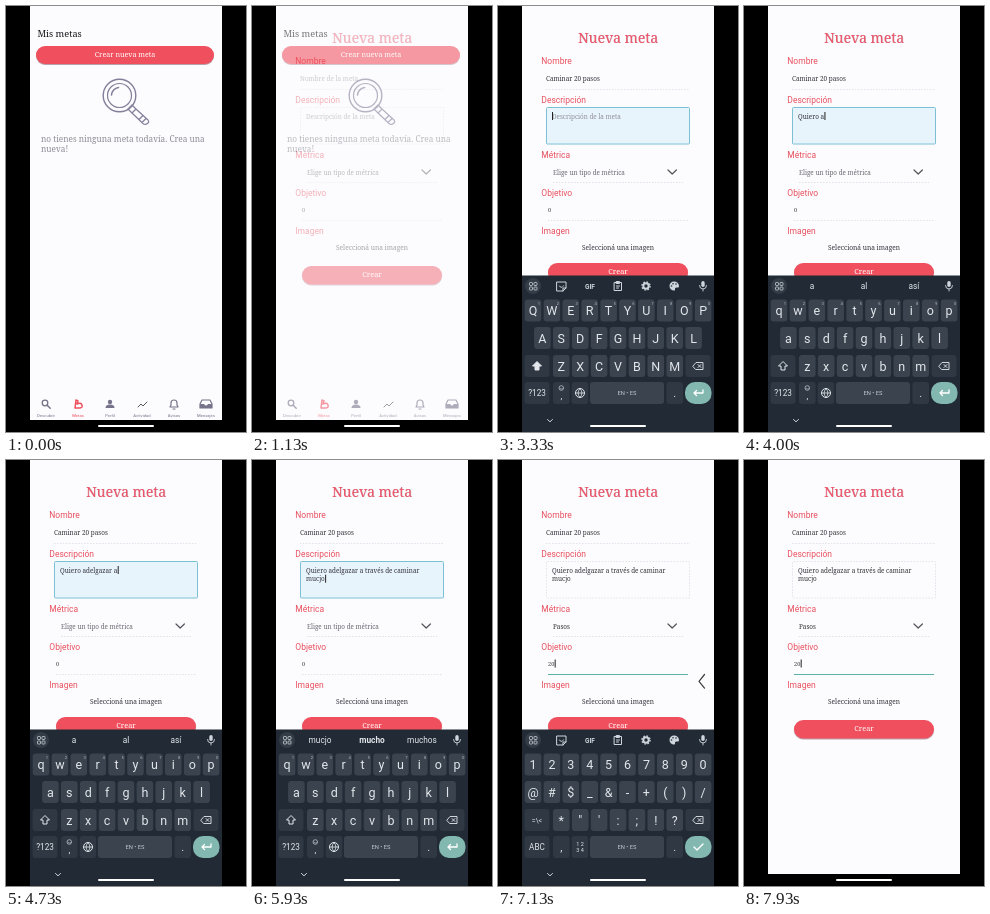
Recreate the animation shown at these times as an HTML page. Size 240x426 px, loop 8 s.

```html
<!DOCTYPE html>
<html lang="es">
<head>
<meta charset="utf-8">
<title>Nueva meta</title>
<style>
html, body { margin: 0; width: 100%; height: 100%; overflow: hidden; background: #000; }
svg { display: block; width: 100vw; height: 100vh; }
text { font-family: Roboto, sans-serif; white-space: pre; }
.slab { font-family: "Noto Serif", serif; }
.mid { text-anchor: middle; }
.line { fill: none; stroke-linecap: round; stroke-linejoin: round; }
</style>
</head>
<body>
<svg id="stage" viewBox="0 0 240 426"></svg>
<script>
const LOOP = 8000;
const PINK = '#f04f5d', INK = '#33323b', GREY = '#8f8d98', PAPER = '#fcfbfd';
const KEY = '#3a434e', KEY_DARK = '#2f3843', KEY_INK = '#e3e7ec';

const rect = (x, y, w, h, fill, r = 0, more = '') =>
  `<rect x="${x}" y="${y}" width="${w}" height="${h}" rx="${r}" fill="${fill}" ${more}/>`;
const circle = (x, y, r, fill, more = '') => `<circle cx="${x}" cy="${y}" r="${r}" fill="${fill}" ${more}/>`;
const text = (x, y, size, fill, str, cls = '', more = '') =>
  `<text x="${x}" y="${y}" font-size="${size}" fill="${fill}" class="${cls}" ${more}>${str}</text>`;
const slab = (x, y, size, fill, str, cls = '', more = '') => text(x, y, size, fill, str, 'slab ' + cls, more);
const line = (d, color, w = 1, more = '') =>
  `<path class="line" d="${d}" stroke="${color}" stroke-width="${w}" ${more}/>`;
const group = (id, body, more = '') => `<g id="${id}" ${more}>${body}</g>`;
const button = (x, y, w, h, label, size) =>
  rect(x, y + 1, w, h, '#b9a0ac', h / 2) + rect(x, y, w, h, PINK, h / 2) +
  slab(x + w / 2, y + h / 2 + 2.2, size, '#fff', label, 'mid', 'font-weight="500"');

function goalList() {
  const tabs = ['Descubrir', 'Metas', 'Perfil', 'Actividad', 'Avisos', 'Mensajes'];
  const c = '#77738a';
  const glass = '#837e99';
  return rect(24, 0, 192, 414, PAPER) +
    slab(31.5, 31, 9.2, '#17161c', 'Mis metas', '', 'font-weight="500"') +
    button(30, 40, 178, 18, 'Crear nueva meta', 7.1) +
    circle(113.5, 89.5, 16.3, 'none', `stroke="${glass}" stroke-width="1.4"`) +
    circle(113.5, 89.5, 12, 'none', `stroke="${glass}" stroke-width="1.2"`) +
    line('M105.5 89a8 8 0 0 1 7-7.5', glass, 1.6) +
    line('M122 103l4-4 4 4-4 4zM126 107l4-4 12 11q1.5 2-.5 3.500t-4 .5zM133 113.500l4-4M136 116.500l4-4', glass, 1.2) +
    slab(35, 136, 8.25, GREY, 'no tienes ninguna meta todavía. Crea una') +
    slab(35, 146, 8.25, GREY, 'nueva!') +
    circle(39, 397, 2.8, 'none', `stroke="${c}" stroke-width="1.3"`) + line('M41.200 399.200l3 3', c, 1.5) +
    line('M70 394l2 1-1 3q4-2 5 1t-3 3h-4z', PINK, 1.5) +
    circle(104, 396, 2.2, c) + `<path d="M99.500 402q0-3.500 4.500-3.500t4.500 3.500z" fill="${c}"/>` +
    line('M132 401l3-3 2 2 4-4', '#56545f', 1) +
    line('M164 401h8l-1-2v-2a3 3 0 0 0-6 0v2zM167 403h2', c, 1.2) +
    line('M194 398l2-4h8l2 4v4h-12z', c, 1.2) + `<path d="M194 398h4q2 3 4 0h4v4h-12z" fill="${c}"/>` +
    tabs.map((s, i) => text(40 + 32 * i, 410.5, 4.2, i === 1 ? PINK : c, s, 'mid')).join('');
}

function goalForm() {
  const label = (y, s) => text(43.3, y, 8.5, '#e85260', s);
  const dots = 'stroke-dasharray="1.5 1.5"';
  const rule = (id, x, y, w) => `<path id="${id}" d="M${x} ${y}h${w}" stroke-width="1"/>`;
  return rect(24, 0, 192, 414, PAPER) +
    slab(120.5, 37, 14, '#8d7c96', 'Nueva meta', 'mid', 'font-weight="500" opacity=".5"') +
    slab(120, 36.5, 14, '#ee5366', 'Nueva meta', 'mid', 'font-weight="500"') +
    label(58, 'Nombre') + label(97, 'Descripción') + label(152, 'Métrica') +
    label(190, 'Objetivo') + label(228, 'Imagen') +
    rule('nameRule', 48, 83.5, 144) + slab(48, 75, 6.4, INK, '', '', 'id="name"') +
    rect(48.5, 101.5, 143, 36.5, 'none', 1, 'id="descBox"') +
    slab(54, 112.5, 6.35, INK, '', '', 'id="desc1"') + slab(54, 121.2, 6.35, INK, '', '', 'id="desc2"') +
    slab(55, 168.5, 6.35, INK, '', '', 'id="metric"') +
    line('M170 164l4.200 4 4.200-4', '#55545c', 1.2) +
    `<path d="M55 176.500h130" stroke="#e2deea" ${dots}/>` +
    rule('goalRule', 50, 214.5, 140) + slab(50, 206, 5.6, INK, '', '', 'id="goal"') +
    slab(120, 244.3, 6.6, INK, 'Seleccioná una imagen', 'mid') +
    group('create', button(50, 260, 140, 18.5, 'Crear', 7.3)) +
    rect(0, 0, 1, 8, '#222', 0, 'id="caret"');
}

const keyBox = (cx, cy, w, fill = KEY) => rect(cx - w / 2, cy - 11, w, 22, fill, 3);
const key = (cx, cy, label, size = 12.5, w = 16.6) =>
  keyBox(cx, cy, w) + text(cx, cy + size * .36, size, KEY_INK, label, 'mid');
const keyRow = (labels, x, y) => labels.map((s, i) => key(x + 18.9 * i, y, s)).join('');

function letters(upper) {
  const row = s => [...(upper ? s.toUpperCase() : s)];
  const hints = [...'1234567890'].map((n, i) => text(41 + 18.9 * i, 299, 4.2, '#b4bbc4', n, 'mid')).join('');
  return keyRow(row('qwertyuiop'), 35, 304.5) + hints +
    keyRow(row('asdfghjkl'), 44.4, 332) + keyRow(row('zxcvbnm'), 63.3, 360) +
    keyBox(39, 360, 25, KEY_DARK) +
    `<path d="M39 355.500l4.500 4.500h-2.500v4h-4v-4h-2.500z" fill="${upper ? KEY_INK : 'none'}" stroke="${KEY_INK}"/>` +
    keyBox(39, 387, 25, KEY_DARK) + text(39, 390, 8.2, KEY_INK, '?123', 'mid') +
    keyBox(63.3, 387, 16.6, KEY_DARK) + text(63.3, 393, 9, KEY_INK, ',', 'mid') +
    circle(63.3, 382, 2.3, 'none', `stroke="${KEY_INK}" stroke-width=".6"`) +
    line('M62 382.500q1.300 1.300 2.600 0', KEY_INK, .5) +
    keyBox(82, 387, 16.6, KEY_DARK) + circle(82, 387, 4.5, 'none', `stroke="${KEY_INK}"`) +
    line('M77.500 387h9M82 382.500q-4 4.500 0 9q4-4.500 0-9', KEY_INK, .8);
}

function symbols() {
  return keyRow([...'1234567890'], 35, 304.5) +
    keyRow(['@', '#', '$', '_', '&amp;', '-', '+', '(', ')', '/'], 35, 332) +
    keyRow([...'*"\':;!?'], 63.3, 360) +
    keyBox(39, 360, 25, KEY_DARK) + text(39, 362.5, 7, KEY_INK, '=\\&lt;', 'mid') +
    keyBox(39, 387, 25, KEY_DARK) + text(39, 390, 8.2, KEY_INK, 'ABC', 'mid') +
    keyBox(63.3, 387, 16.6, KEY_DARK) + text(63.3, 391, 11, KEY_INK, ',', 'mid') +
    keyBox(82, 387, 16.6, KEY_DARK) +
    text(82, 386, 5.5, KEY_INK, '1 2', 'mid') + text(82, 392, 5.5, KEY_INK, '3 4', 'mid');
}

function keyboard() {
  const c = '#cfd5dc';
  const tiles = [[32, 277], [36.5, 277], [32, 281.5], [36.5, 281.5]]
    .map(([x, y]) => rect(x - .5, y - .5, 3, 3, 'none', .7, `stroke="${c}" stroke-width=".8"`)).join('');
  const tools =
    line('M59 276h9v6l-3 3h-6zM65 285v-3h3M61.500 280q1.500 3 4 0', c, 1) +
    text(92, 282.5, 6.5, c, 'GIF', 'mid', 'font-weight="700"') +
    line('M116.500 276.500h7v8h-7zM118.500 275.500h3v2h-3zM118.500 280h3M118.500 282h2', c, 1) +
    circle(148, 280, 2.7, 'none', `stroke="${c}" stroke-width="2"`) +
    circle(148, 280, 4.1, 'none', `stroke="${c}" stroke-width="1.3" stroke-dasharray="1.6 1.62"`) +
    `<path d="M176 275.500a4.500 4.500 0 1 0 0 9q1.500 0 1-1.500t1.500-1.500h1.500q1 0 1-1.500a4.800 4.500 0 0 0-5-4.500" fill="${c}"/>` +
    [[173.5, 280], [175, 277.7], [178, 278]].map(([x, y]) => circle(x, y, .8, '#222b36')).join('');
  const words = [68, 120, 170].map((x, i) => text(x, 283, 8.3, KEY_INK, '', 'mid', `id="word${i}"`)).join('');
  return rect(24, 269.5, 192, 157, '#212a35') +
    circle(35, 280, 8, '#333c47') + tiles + group('tools', tools) + group('words', words) +
    rect(203.3, 275, 3.4, 6, c, 1.7) + line('M201.500 279.500a3.500 3.500 0 0 0 7 0M205 283v2', c, .9) +
    group('upper', letters(true)) + group('lower', letters(false)) + group('symbols', symbols()) +
    keyBox(200, 360, 25, KEY_DARK) +
    line('M195 360l3-3.500h7v7h-7zM200 358.500l3 3M203 358.500l-3 3', KEY_INK, .9) +
    keyBox(129, 387, 74, KEY) + text(129, 389.3, 5.8, '#c4cad2', 'EN • ES', 'mid') +
    keyBox(176.7, 387, 16.6, KEY_DARK) + text(176.7, 391, 11, KEY_INK, '.', 'mid') +
    rect(187, 376, 26.5, 22, '#82b8b0', 10) +
    group('check', line('M196 387l3 3 6-6', '#fff', 1.4)) +
    group('enter', line('M205 384v3h-9M198.500 384.500l-2.500 2.500 2.500 2.500', '#fff', 1.3)) +
    line('M49.500 413.500l2.500 2.300 2.500-2.300', c, 1);
}

const picker = rect(24, 0, 192, 426, '#000', 0, 'opacity=".55"') + rect(40, 185, 160, 52, PAPER, 2) +
  text(50, 204, 8, INK, 'Elige un tipo de métrica') + text(50, 226, 8, INK, 'Pasos');

document.getElementById('stage').innerHTML =
  rect(0, 0, 240, 426, '#000') + group('list', goalList()) + group('form', goalForm()) +
  group('back', line('M206.500 214.500l-5.500 6.800 5.500 6.800', '#3b3a40', 1.2)) +
  group('keys', keyboard()) + group('picker', picker) +
  rect(0, 0, 24, 426, '#000') + rect(216, 0, 24, 426, '#000') + rect(92, 419, 56, 2, '#fff', 1);

const el = Object.fromEntries([...document.querySelectorAll('[id]')].map(n => [n.id, n]));
const show = (node, on) => { node.style.display = on ? '' : 'none'; };
const set = (node, attrs) => { for (const k in attrs) node.setAttribute(k, attrs[k]); };

// Interpolates through [time, value] steps.
function track(steps, t) {
  if (t <= steps[0][0]) return steps[0][1];
  for (let i = 1; i < steps.length; i++) {
    const [t0, v0] = steps[i - 1], [t1, v1] = steps[i];
    if (t < t1) return v0 + (v1 - v0) * (t - t0) / (t1 - t0);
  }
  return steps[steps.length - 1][1];
}

const NAME = 'Caminar 20 pasos', DESC = 'Quiero adelgazar a través de caminar mucjo';
const LINE_BREAK = 36;
const nameTyping = [[2280, 0], [3130, 16]];
const descTyping = [[3430, 0], [4700, 18], [4770, 18], [5870, 42]];
const keyboardDrop = [[1880, 157], [2030, 0], [5990, 0], [6090, 157], [6520, 157], [6640, 0], [7200, 0], [7360, 157]];
const backSlide = [[7030, 14], [7110, 0], [7170, 0], [7220, 14]];

const focusAt = t => t < 1850 ? '' : t < 3250 ? 'name' : t < 6000 ? 'desc' : t < 6500 ? '' : 'goal';
const typed = (str, steps, t) => str.slice(0, Math.floor(track(steps, t)));

function fill(node, value, hint) {
  node.textContent = value || hint;
  node.setAttribute('fill', value ? INK : GREY);
}

function suggest(word, full) {
  if (word === 'a') return ['a', 'al', 'así'];
  const best = full === 'mucjo' ? 'mucho' : full;
  return [word, best, best + 's'];
}

function render(t) {
  const focus = focusAt(t);
  const name = typed(NAME, nameTyping, t), desc = typed(DESC, descTyping, t);
  const goal = t < 6800 ? '0' : t < 6920 ? '2' : '20';

  show(el.list, t < 1200);
  show(el.form, t >= 1080);
  el.form.setAttribute('opacity', track([[1080, 0], [1200, 1]], t));

  fill(el.name, name, 'Nombre de la meta');
  fill(el.desc1, desc.slice(0, LINE_BREAK), 'Descripción de la meta');
  el.desc2.textContent = desc.slice(LINE_BREAK + 1);
  fill(el.metric, t >= 6400 ? 'Pasos' : '', 'Elige un tipo de métrica');
  el.metric.setAttribute('fill', t >= 6400 ? INK : '#6b6974');
  el.goal.textContent = goal;

  const rule = (node, on, color) => set(node, { stroke: on ? color : '#e4e0ec', 'stroke-dasharray': on ? 'none' : '1.5 1.5' });
  rule(el.nameRule, focus === 'name', '#6fb0bf');
  rule(el.descBox, focus === 'desc', '#7cc0d4');
  rule(el.goalRule, focus === 'goal', '#58b3a6');
  el.descBox.setAttribute('fill', focus === 'desc' ? '#e8f4fc' : 'none');

  const secondLine = desc.length > LINE_BREAK + 1;
  const field = { name: el.name, desc: secondLine ? el.desc2 : el.desc1, goal: el.goal }[focus];
  const value = { name, desc, goal }[focus] || '';
  show(el.caret, field && (t + 80) % 400 < 240);
  if (field) set(el.caret, {
    x: +field.getAttribute('x') + (value ? field.getComputedTextLength() + .4 : 0),
    y: field.getAttribute('y') - 6.5
  });

  const drop = track(keyboardDrop, t);
  show(el.keys, drop < 157);
  el.keys.setAttribute('transform', `translate(0 ${drop})`);
  el.create.setAttribute('transform', `translate(0 ${drop < 80 ? -3 : 0})`);

  const numeric = focus === 'goal' ? t >= 6720 : focus === 'name' && /^Caminar (2|20)?$/.test(name);
  const empty = !value;
  const prose = !empty && focus !== 'goal' && !numeric && !(focus === 'name' && name === NAME && t > 3200);
  show(el.symbols, numeric);
  show(el.upper, !numeric && empty);
  show(el.lower, !numeric && !empty);
  show(el.check, focus !== 'desc');
  show(el.enter, focus === 'desc');
  show(el.words, prose);
  show(el.tools, !prose);
  if (prose) {
    const parts = value.trim().split(' ');
    const full = (focus === 'name' ? NAME : DESC).split(' ')[parts.length - 1];
    suggest(parts[parts.length - 1], full).forEach((s, i) => { el['word' + i].textContent = s; });
    el.word1.setAttribute('font-weight', full === 'mucjo' ? 700 : 400);
  }

  show(el.back, t > 7030 && t < 7220);
  el.back.setAttribute('transform', `translate(${track(backSlide, t)} 0)`);
  show(el.picker, t >= 6030 && t < 6430);
  el.picker.setAttribute('opacity', track([[6030, .3], [6090, 1], [6390, 1], [6430, .2]], t));
}

const start = performance.now();
function tick() {
  render((performance.now() - start) % LOOP);
  requestAnimationFrame(tick);
}
tick();
</script>
</body>
</html>
```
